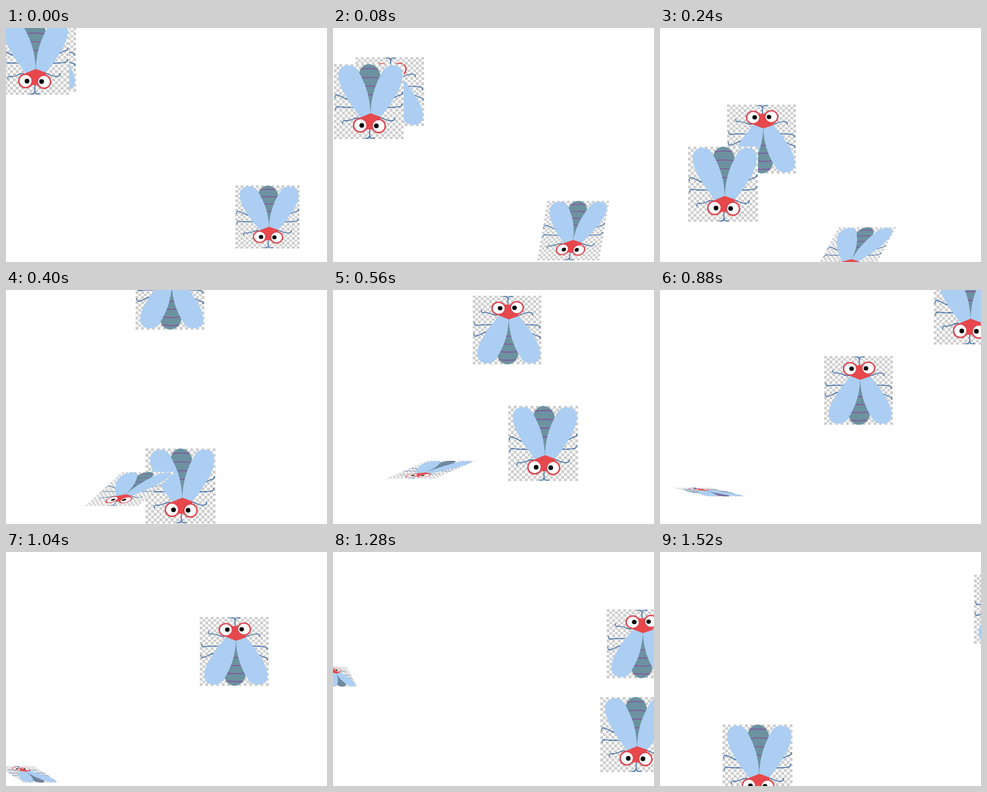
An HTML page for the animation above (1.6 s loop, 550x400 px).

```html
<!DOCTYPE html>
<html lang="en">
<head>
<meta charset="utf-8">
<title>Flies</title>
<style>
html, body { margin: 0; width: 100%; height: 100%; overflow: hidden; background: #fff; }
svg { display: block; width: 550px; height: 400px; }
</style>
</head>
<body>
<svg viewBox="0 0 550 400">
  <defs>
    <pattern id="check" width="9.6" height="9.6" patternUnits="userSpaceOnUse">
      <g shape-rendering="crispEdges">
        <rect width="9.6" height="9.6" fill="#fff"/>
        <path d="M0 0h4.8v4.8H0zM4.8 4.8h4.8v4.8H4.8z" fill="#ccc"/>
      </g>
    </pattern>
    <clipPath id="card"><rect width="120" height="129"/></clipPath>
    <clipPath id="belly"><path id="abdomen" d="M42 18Q48 0 61 0.5T80 18L63 88Z"/></clipPath>
    <path id="wing" d="M8 22C7 9 14 3 24 2.500C34 2 40 7 44 16C55 36 62 56 63 86L46 92C28 68 10 44 8 22Z"/>
    <g id="fly" clip-path="url(#card)">
      <rect width="120" height="129" fill="url(#check)"/>
      <path id="limbs" fill="none" stroke="#3f6ea6" stroke-width="1.600" stroke-linecap="round"/>
      <use href="#abdomen" fill="#6c92a0"/>
      <path id="stripes" clip-path="url(#belly)" fill="none" stroke="#87529b" stroke-width="1.700"/>
      <g fill="#abcef2">
        <use href="#wing"/>
        <use href="#wing" transform="translate(126) scale(-1 1)"/>
      </g>
      <path d="M45 92L63 84.500L81 91L73 112H54Z" fill="#e7484c"/>
      <g fill="#fff" stroke="#e0454f" stroke-width="2.500">
        <circle cx="45.500" cy="105" r="11.600"/>
        <circle cx="77" cy="106.300" r="11.300"/>
      </g>
      <circle cx="48" cy="105.300" r="4"/>
      <circle cx="73" cy="106" r="4"/>
    </g>
  </defs>
  <use id="riser" href="#fly"/>
  <use id="diver" href="#fly"/>
  <use id="tumbler" href="#fly"/>
</svg>
<script>
const STEP = 80, COUNT = 20;
const $ = id => document.getElementById(id);

// Three legs per side, each a hooked foot and a wavy line to the body.
function legs(side) {
  const x = v => 60 + side * (60 - v);
  return [[4, 53, 26], [5, 73, 36], [17, 97, 44]].map(([foot, y, root], i) =>
    `M${x(foot - 2)} ${y - side * 5}Q${x(foot - 2)} ${y} ${x(foot + 2)} ${y}` +
    `C${x(foot + 12)} ${y + 3} ${x(root - 8)} ${y + 8 - i * 8} ${x(root)} ${y + 8 - i * 6}`).join("");
}

const antenna = dx => `M61.500 112V121Q61 129 ${61.5 + dx} 127`;
$("limbs").setAttribute("d", legs(-1) + legs(1) + antenna(-8) + antenna(8));
$("stripes").setAttribute("d",
  [0, 1, 2, 3].map(i => `M42 ${10 + 15 * i}q20 -4 40 0`).join(""));

// Flight paths: centre points reached at the shared steps.
const stops = [0, 3, 5, 9, 13, 16, 19];
const paths = {
  riser: [[61, 50], [174, 190], [281, 9], [307, 154], [391, 170], [528, 157], [597, 98]],
  diver: [[48, 50], [108, 267], [299, 335], [411, 161], [622, -35], [518, 312], [167, 359]],
  tumbler: [[448, 323], [333, 382], [213, 340], [134, 294], [39, 380], [7, 213], [-60, 85]]
};

// Smooth curve through the stops.
function pointAt(path, t) {
  const last = stops.length - 1;
  const i = Math.max(0, stops.findLastIndex((s, n) => n < last && s <= t));
  const span = stops[i + 1] - stops[i], u = (t - stops[i]) / span;
  const ease = u * u * (3 - 2 * u);
  const slope = (n, c) => {
    const p = Math.max(n - 1, 0), q = Math.min(n + 1, last);
    return (path[q][c] - path[p][c]) / (stops[q] - stops[p]);
  };
  return [0, 1].map(c =>
    path[i][c] + ease * (path[i + 1][c] - path[i][c])
    + span * u * (1 - u) * ((1 - u) * slope(i, c) - u * slope(i + 1, c)));
}

// Skew the card by turning its upright edge while the flat edge stays level.
function place(id, t, w, h, degrees) {
  const [cx, cy] = pointAt(paths[id], t), a = degrees * Math.PI / 180;
  const hx = -h * Math.sin(a), hy = h * Math.cos(a);
  $(id).setAttribute("transform",
    `matrix(${w / 120} 0 ${hx / 129} ${hy / 129} ${cx - (w + hx) / 2} ${cy - hy / 2})`);
}

function draw(ms) {
  const t = Math.floor(ms / STEP) % COUNT;
  place("riser", t, 118, 118, 180);
  place("diver", t, 120, 129, 0);
  place("tumbler", t, 110 - 3.7 * t, 108 - 4.3 * t, 9.5 * t);
}

const start = performance.now();
function tick() {
  draw(performance.now() - start);
  requestAnimationFrame(tick);
}
tick();
</script>
</body>
</html>
```
